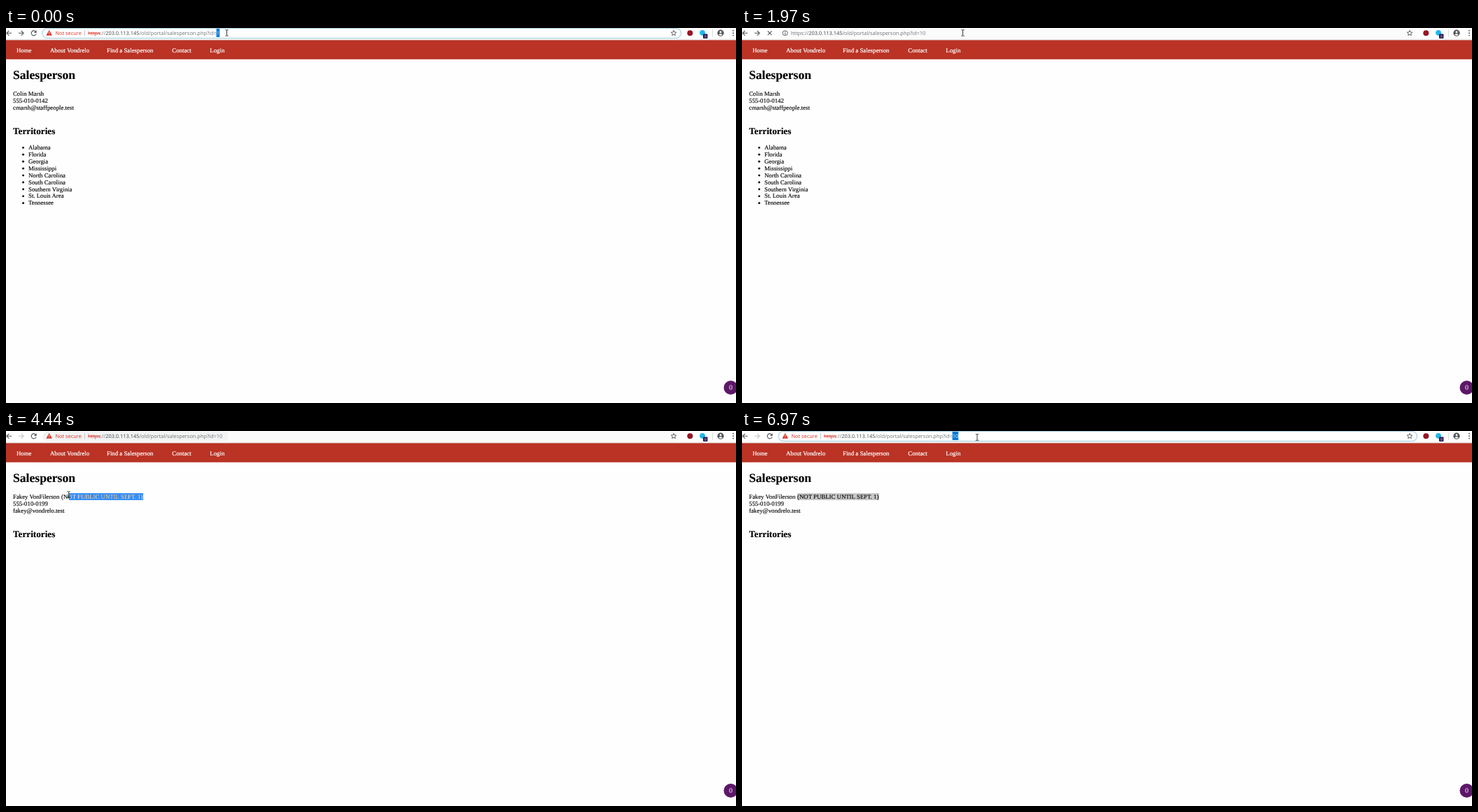
An HTML page for the animation above (8 s loop, 1043 px wide and 537 px high).

```html
<!DOCTYPE html>
<html lang="en">
<head>
<meta charset="utf-8">
<title>Salesperson</title>
<style>
  html, body { margin: 0; width: 100%; height: 100%; overflow: hidden; background: #fefefe; }
  svg { display: block; width: 100%; height: 100%; }
  text { white-space: pre; text-rendering: geometricPrecision; }
  .page text { font: 8.8px "Liberation Serif", "Times New Roman", serif; fill: #000; stroke: #000; stroke-width: .12; }
  .page .nav { fill: #fff; stroke: #fff; stroke-width: .2; }
  .page .h1 { font-size: 17.6px; font-weight: 700; }
  .page .h2 { font-size: 13.2px; font-weight: 700; }
  .page .count { font-size: 10px; fill: #fff; stroke: none; text-anchor: middle; }
  .ui text { font: 7.4px "Open Sans", "Noto Sans", sans-serif; fill: #3c4043; }
  .ui .dim { fill: #6f7377; }
  .ui .red { fill: #d93025; }
  .ui .struck { fill: #d93025; text-decoration: line-through; }
  .ui .white { fill: #fff; }
  .page .white { fill: #fff; stroke: #fff; }
  .ui .row { font-size: 7.3px; }
  .ui .link { font-size: 7.5px; font-weight: 700; fill: #1b66d8; }
  .line { fill: none; stroke: #505357; stroke-width: 1.1; }
</style>
</head>
<body>
<svg viewBox="0 0 1043 537" preserveAspectRatio="none">
  <defs>
    <clipPath id="pageClip"><rect id="pageClipBox" y="88" height="13"/></clipPath>
    <clipPath id="urlClip"><rect id="urlClipBox" y="0" height="15"/></clipPath>
    <clipPath id="chipClip"><rect id="chipClipBox" x="54" y="0" height="15"/></clipPath>
    <linearGradient id="shade" x2="0" y2="1">
      <stop offset="0" stop-opacity=".26"/>
      <stop offset="1" stop-opacity=".05"/>
    </linearGradient>
    <g id="globe">
      <circle r="3.9" fill="#55595e"/>
      <path d="M-2.8-1.5L-.6-2.8L.8-1.2L-.8.2L-1.6 1.4ZM1-.2L3 .5L1.2 2.8L.2 1.4Z" fill="#fff"/>
    </g>
  </defs>

  <rect width="1043" height="537" fill="#fefefe"/>

  <g class="page">
    <rect y="17.2" width="1043" height="27.6" fill="#ba3325"/>
    <g id="nav"></g>
    <text class="h1" x="10" y="73">Salesperson</text>
    <text class="h2" x="10" y="151.5">Territories</text>
    <g id="first"></g>
    <g id="second">
      <rect id="pageSel" y="89" height="10"/>
    </g>
    <circle cx="1035.5" cy="515" r="10" fill="#5d1768"/>
    <text id="count" class="count" x="1035.5" y="518.4">0</text>
    <circle id="mark" cx="1035.5" cy="515" r="4" fill="#fff"/>
  </g>

  <g class="ui">
    <rect width="1043" height="16" fill="#fff"/>
    <rect y="15.6" width="1043" height="1.6" fill="#ececec"/>
    <path class="line" d="M8 7.3H1M4.4 3.8L.9 7.3L4.4 10.8"/>
    <path id="forward" class="line" d="M18 7.3H25M21.6 3.8L25.1 7.3L21.6 10.8"/>
    <g id="reload">
      <path class="line" d="M42.5 5.2A3.5 3.5 0 1 0 43.1 8.3"/>
      <path d="M43.6 3.2V6.9H39.9Z" fill="#505357"/>
    </g>
    <path id="stop" class="line" d="M36.7 4.4L42.5 10.2M42.5 4.4L36.7 10.2"/>

    <g id="idle">
      <rect x="52" y=".5" width="912" height="14" rx="7" fill="#fbfbfb"/>
      <path id="tint" d="M317 1H59A6.5 6.5 0 0 0 59 14H317Z" fill="#f2f3f3"/>
    </g>
    <rect id="focus" x="52" y=".5" width="912.5" height="14" rx="7" fill="#fff" stroke="#a2cfe0" stroke-width="1.1"/>

    <path id="star" class="line" style="stroke-width:.9"/>
    <circle cx="977.3" cy="7.2" r="4" fill="#941722"/>
    <circle cx="995" cy="6.8" r="3.9" fill="#24b5ea"/>
    <rect x="996" y="8.6" width="6.4" height="6.4" rx="1" fill="#28124a"/>
    <text x="999.2" y="13.8" text-anchor="middle" class="white" style="font-size:5.2px">0</text>
    <path d="M1009.5 2V13" stroke="#dcdee0"/>
    <circle cx="1021" cy="7.2" r="4.6" fill="#505357"/>
    <circle cx="1021" cy="5.7" r="1.5" fill="#fff"/>
    <path d="M1018.2 9.6Q1021 7 1023.8 9.6Q1021 12 1018.2 9.6Z" fill="#fff"/>
    <g fill="#505357">
      <circle cx="1039" cy="3.8" r=".95"/><circle cx="1039" cy="7.2" r=".95"/><circle cx="1039" cy="10.6" r=".95"/>
    </g>

    <g id="drop">
      <path d="M48.5 56H967.5V63Q967.5 66 964 66H52Q48.5 66 48.5 63Z" fill="url(#shade)"/>
      <path d="M48 0H968V56Q968 59 965 59H51Q48 59 48 56Z" fill="#fbfbfb"/>
      <use href="#globe" x="61.7" y="7.2"/>
      <use href="#globe" x="61.7" y="28"/>
      <path class="line" style="stroke-width:.9" d="M62.4 49.4L64.6 51.6M62.9 47.6A2.3 2.3 0 1 1 58.3 47.6A2.3 2.3 0 1 1 62.9 47.6"/>
      <text class="row" x="77" y="30.7">Salesperson: Fakey VonFilerson (NOT PUBLIC UNTIL SEPT. 1)</text>
      <text class="dim" x="283.5" y="30.7">-</text>
      <text id="link" class="link" x="289" y="30.7"></text>
      <text id="query" x="77" y="51.3"></text>
      <text class="dim" x="271" y="51.3">- Quolle Search</text>
    </g>

    <g id="info">
      <circle class="line" cx="61.6" cy="7.3" r="3.5" style="stroke-width:.9"/>
      <path d="M61.6 6.7V9.4M61.6 5V5.9" stroke="#505357"/>
    </g>
    <g id="chip">
      <path d="M61.7 3.1L65.9 10.7H57.5Z" fill="#d93025"/>
      <path d="M61.7 5.6V8M61.7 8.8V9.7" stroke="#fff" stroke-width=".9"/>
      <text class="red" x="70.5" y="10" clip-path="url(#chipClip)">Not secure</text>
      <path id="bar" d="M0 3V11.5" stroke="#c4c6c9"/>
    </g>
    <g id="url">
      <g id="urlPlain"></g>
      <rect id="urlSel" y="1" height="12" fill="#0078d7"/>
      <g id="urlWhite" clip-path="url(#urlClip)"></g>
      <rect id="caret" y="1.5" width=".8" height="11" fill="#222"/>
    </g>
  </g>

  <g id="beam">
    <path d="M-2.2-4.3H-.6L0-3.8L.6-4.3H2.2M0-3.8V3.8M-2.2 4.3H-.6L0 3.8L.6 4.3H2.2" fill="none" stroke="#222" stroke-width=".9"/>
  </g>
  <path id="arrow" d="M0 0V9.3L2.1 7.4L3.6 10.7L5 10.1L3.5 6.9H6.5Z" fill="#fff" stroke="#222" stroke-width=".6"/>
</svg>

<script>
const LOOP = 8000;
const HOST = '203.0.113.145';
const PATH = '/old/portal/salesperson.php?id=';
const NOTE = '(NOT PUBLIC UNTIL SEPT. 1)';
const $ = id => document.getElementById(id);

function add(parent, tag, attrs, text) {
  const el = document.createElementNS('http://www.w3.org/2000/svg', tag);
  for (const k in attrs) el.setAttribute(k, attrs[k]);
  if (text) el.textContent = text;
  return parent.appendChild(el);
}
const set = (id, attrs) => { for (const k in attrs) $(id).setAttribute(k, attrs[k]); };
const show = (id, on) => { $(id).style.display = on ? '' : 'none'; };
const put = (id, x, y) => set(id, { transform: `translate(${x} ${y})` });
const lines = (parent, list, x, y, step = 9.92) =>
  list.forEach((s, i) => add(parent, 'text', { x, y: y + i * step }, s));

// Static page content
[[15, 'Home'], [63, 'About Vondrelo'], [144, 'Find a Salesperson'], [237.3, 'Contact'], [291.3, 'Login']]
  .forEach(([x, s]) => add($('nav'), 'text', { class: 'nav', x, y: 35 }, s));

const areas = ['Alabama', 'Florida', 'Georgia', 'Mississippi', 'North Carolina', 'South Carolina',
  'Southern Virginia', 'St. Louis Area', 'Tennessee'];
lines($('first'), ['Colin Marsh', '555-010-0142', 'cmarsh@staffpeople.test'], 10, 97.2);
lines($('first'), areas, 32, 174);
areas.forEach((_, i) => add($('first'), 'circle', { cx: 24.6, cy: 171.4 + i * 9.92, r: 1.45 }));

lines($('second'), ['Fakey VonFilerson', '555-010-0199', 'fakey@vondrelo.test'], 10, 97.2);
add($('second'), 'text', { x: 79, y: 97.2 }, NOTE);
add($('second'), 'text', { id: 'noteWhite', class: 'white', x: 79, y: 97.2, 'clip-path': 'url(#pageClip)' }, NOTE);

$('link').textContent = $('query').textContent = 'https://' + HOST + PATH + '10';

let star = '';
for (let i = 0; i < 10; i++) {
  const r = i % 2 ? 1.8 : 4, a = i * Math.PI / 5 - Math.PI / 2;
  star += `${i ? 'L' : 'M'}${954 + r * Math.cos(a)} ${7.4 + r * Math.sin(a)}`;
}
set('star', { d: star + 'Z' });

// Address text, once in its own colours and once in white for the selection
function address(parent, white) {
  const text = add(parent, 'text', { x: 0, y: 10 });
  const part = (s, cls) => add(text, 'tspan', { class: white ? 'white' : cls }, s);
  const scheme = part('https', 'dim');
  part('://', 'dim');
  part(HOST, '');
  part(PATH, 'dim');
  return { scheme, id: part('1', 'dim') };
}
const plain = address($('urlPlain'), false);
const white = address($('urlWhite'), true);

// Timelines: [start, ...values], held until the next start
const BAR = [[0, 'focus', 117], [1260, 'drop', 77], [1970, 'info', 70], [2250, 'idle', 95],
  [2370, 'idle', 112], [2510, 'idle', 117], [5870, 'focus', 117]];
const URL_SEL = [[0, 183.6, 188.2], [1120, 0, 0], [5870, 0, 192.2], [6120, 0, 0], [6270, 0, 192.2],
  [6410, 183.6, 192.2], [6690, 0, 192.2], [6970, 183.6, 192.2]];
const CARET = [[0, -1], [1120, 188.2], [1260, 191.6], [1690, -1], [6120, 191.8], [6270, -1]];
const NOTE_FROM = [[0, 196], [4040, 152], [4160, 112], [4310, 98], [4440, 90], [4590, 84], [4740, 79]];
const POINTER = [[0, 'beam', 315.5, 7], [3350, 'arrow', 194, 79], [3500, 'arrow', 178, 109],
  [3620, 'arrow', 187, 103], [3740, 'beam', 196.5, 98.3], [3890, 'arrow', 200, 95],
  [4040, 'beam', 152, 93], [4160, 'beam', 111.7, 92], [4310, 'beam', 98, 91], [4440, 'beam', 89.6, 91],
  [4590, 'beam', 83.8, 91], [4740, 'beam', 81.5, 91], [4860, 'beam', 80.5, 91],
  [5010, 'arrow', 160, 68], [5140, 'arrow', 241, 39], [5290, 'arrow', 285, 35], [5450, 'arrow', 314, 35],
  [5590, 'arrow', 322, 19], [5720, 'beam', 349, 6], [5870, 'beam', 336, 9]];

function at(list, t) {
  let hit = list[0];
  for (const step of list) if (step[0] <= t) hit = step;
  return hit.slice(1);
}

function draw(t) {
  const moved = t >= 2250;
  const [mode, x] = at(BAR, t);
  const chip = mode === 'focus' || mode === 'idle';

  show('first', !moved);
  show('second', moved);
  const ghost = moved && t < 4310;
  show('count', !ghost);
  show('mark', ghost);

  const [from] = at(NOTE_FROM, t);
  const active = t < 5870;
  set('pageSel', { x: from, width: 196 - from, fill: active ? '#3390ff' : '#c8c8c8' });
  set('pageClipBox', { x: from, width: 196 - from });
  show('noteWhite', active);

  set('forward', { style: `stroke:${moved ? '#c3c5c8' : '#505357'}` });
  show('stop', mode === 'info');
  show('reload', mode !== 'info');
  show('idle', mode === 'idle' || mode === 'info');
  show('tint', mode === 'idle');
  show('focus', mode === 'focus');
  show('star', mode !== 'drop');
  show('drop', mode === 'drop');
  show('info', mode === 'info');
  show('chip', chip);
  set('chipClipBox', { width: x - 8 - 54 });
  put('bar', x - 4.5, 0);

  put('url', x, 0);
  plain.scheme.setAttribute('class', chip ? 'struck' : 'dim');
  plain.id.textContent = white.id.textContent = t < 1260 ? '1' : '10';
  const [a, b] = at(URL_SEL, t);
  set('urlSel', { x: a, width: b - a });
  set('urlClipBox', { x: a, width: b - a });
  const [caret] = at(CARET, t);
  show('caret', caret >= 0);
  set('caret', { x: caret });

  const [kind, px, py] = at(POINTER, t);
  for (const id of ['beam', 'arrow']) show(id, id === kind);
  put(kind, px, py);
}

const start = performance.now();
function tick() {
  draw((performance.now() - start) % LOOP);
  requestAnimationFrame(tick);
}
tick();
</script>
</body>
</html>
```
